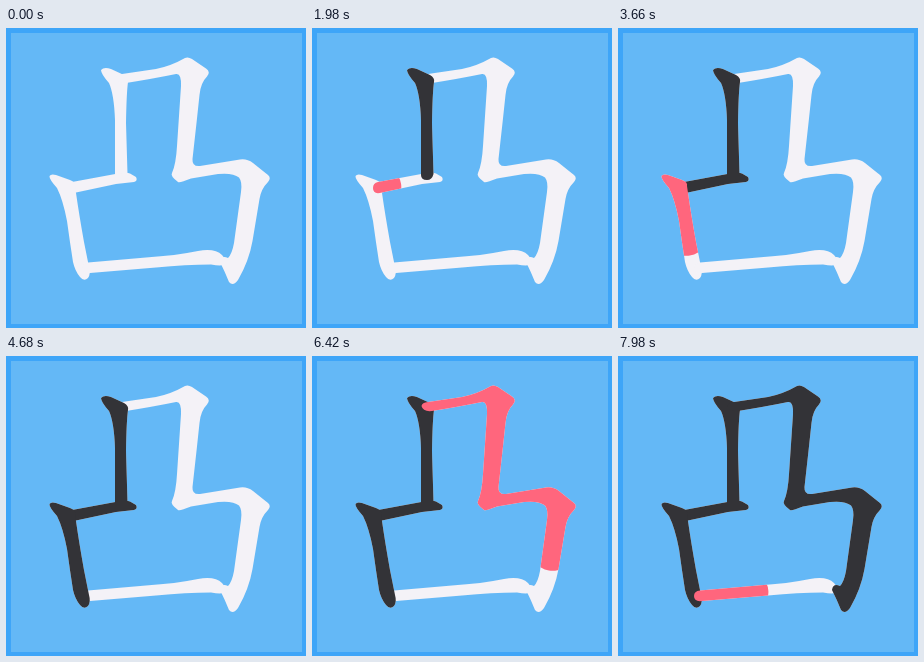
An HTML page with a canvas for the animation above (8 s loop, 300 by 300 pixels).

```html
<!DOCTYPE html>
<html lang="zh">
<head>
<meta charset="utf-8">
<title>Stroke order</title>
<style>
html, body { margin: 0; width: 100%; height: 100%; overflow: hidden; background: #64b8f6; }
canvas { display: block; }
</style>
</head>
<body>
<canvas id="stage" width="300" height="300"></canvas>
<script>
const LOOP = 8000, TICK = 60, BRUSH = 44;
const PAPER = '#64b8f6', BORDER = '#3ea5f8';
const WHITE = '#f4f2f7', BLACK = '#333337', RED = '#ff667d';
const ctx = document.getElementById('stage').getContext('2d');

// shape: outline; spine: brush path with a 50px run-up;
// from, run: brush travel along the spine; start, time: in ms
const strokes = [
  {
    start: 120, time: 1080, from: 53, run: 79,
    shape: 'M95 42Q98 38.5 105 41L118 47Q123 50 122 54Q120.5 65 120 95L121.5 146Q120 152 115 152Q109 152 109 147L109 92Q108 66 103 55Q95 46 95 42Z',
    spine: 'M59 9L97 42L112 55L115 150'
  },
  {
    start: 1620, time: 780, from: 23, run: 77,
    shape: 'M66 154L112 145.5Q121 144 124 145.5L130 149Q132 153 128 154L110 156L70 164.5Q61 167 61 160Q61 155 66 154Z',
    spine: 'M11 167L61 160L131 150'
  },
  {
    start: 2820, time: 1140, from: 53, run: 74,
    shape: 'M43.5 148Q45 145.5 50 147L64 152Q70 154 69 158L70 165Q73 186 78 214L83 239Q85 246 82 250Q78 254 74 249Q69 243 67 234Q64 215 61 193Q57 172 51 160Q43 151 43.5 148Z',
    spine: 'M7 114L44 148L56 159L66 190L72 228L80 252'
  },
  {
    start: 4380, time: 2460, from: 5.5, run: 353,
    shape: 'M116 46L150 41Q165 38 179 30Q182 28.5 186 31L200 40.5Q205 44 201 48.5Q194.5 55 193.5 67L190.5 95L186.5 131Q186 139 194 138L234 131.5Q241 130.5 247 135L262 147Q265.5 150 262 154Q255 161 253.5 171L246.5 213Q243 233 232 252Q227 259 223 254Q219 244 214 234Q215 227 222 230Q226 226 228 215L235 164Q236.5 154 233 149.5Q227 144.5 212 146L185 150.5Q174 155 172 154Q164 148 166 145Q170 136 171 118L175 58Q175.5 45 170 46Q148 50.5 120 55Q111 56 109.5 50Q110 46.5 116 46Z',
    spine: 'M62 57L112 50L170 42L182 48L181 95L178 135L182 147L235 140L246 150L241 190L237 214L229 252'
  },
  {
    start: 7260, time: 1400, from: 28, run: 143,
    shape: 'M82 234.5L140 229.5Q170 227.5 192 223Q209 220 216 227Q221 232 217 237Q214 238 205 236.5Q180 236.5 150 239.5L84 245Q76 246 76 240Q76 235 82 234.5Z',
    spine: 'M26 244L76 240L219 230'
  }
].map(s => ({ ...s, shape: new Path2D(s.shape), spine: new Path2D(s.spine) }));

const ease = p => (1 - Math.cos(Math.PI * p)) / 2;

function fill(stroke, color) {
  ctx.fillStyle = color;
  ctx.fill(stroke.shape);
}

function paint(stroke, p) {
  if (p >= 1) return fill(stroke, RED);
  ctx.save();
  ctx.clip(stroke.shape);
  ctx.strokeStyle = RED;
  ctx.lineWidth = BRUSH;
  ctx.lineCap = ctx.lineJoin = 'round';
  ctx.setLineDash([stroke.from + stroke.run * ease(p), 999]);
  ctx.stroke(stroke.spine);
  ctx.restore();
}

function draw(now) {
  const t = Math.floor(now % LOOP / TICK) * TICK;
  ctx.fillStyle = BORDER;
  ctx.fillRect(0, 0, 300, 300);
  ctx.fillStyle = PAPER;
  ctx.fillRect(5, 5, 291, 291);

  const begun = strokes.filter(s => t >= s.start);
  const current = begun.pop();
  strokes.forEach(s => fill(s, WHITE));
  begun.forEach(s => fill(s, BLACK));
  if (current) paint(current, (t - current.start) / current.time);
}

const t0 = performance.now();
function loop() {
  draw(performance.now() - t0);
  requestAnimationFrame(loop);
}
loop();
</script>
</body>
</html>
```
